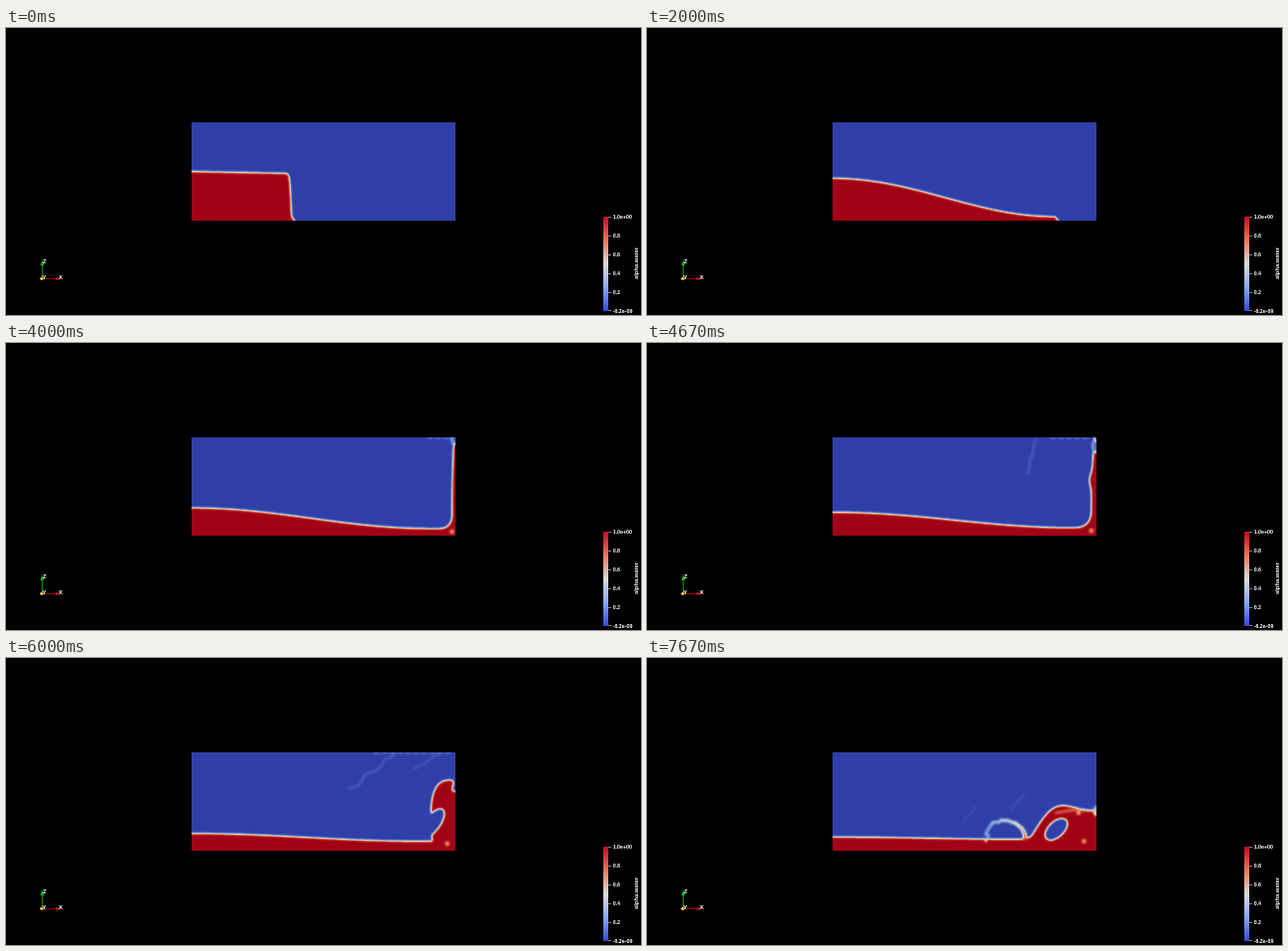
Recreate the animation shown at these times as an HTML page with a canvas. Size 640 by 289 pixels, loop 8 s.

```html
<!DOCTYPE html>
<html lang="en">
<head>
<meta charset="utf-8">
<title>Dam break</title>
<style>
  html, body { margin: 0; width: 100%; height: 100%; overflow: hidden; background: #000; }
  canvas { position: absolute; left: 187px; top: 95px; }
  svg { position: absolute; left: 0; top: 0; }
  text { font: bold 5.3px "Liberation Sans", Arial, sans-serif; fill: #fff; }
  .axes text { font-size: 6px; }
  .scale .title { font-size: 5.8px; }
</style>
</head>
<body>
<canvas id="tank" width="266" height="99"></canvas>
<svg width="640" height="289" viewBox="0 0 640 289">
  <defs>
    <linearGradient id="bar" x1="0" y1="0" x2="0" y2="1">
      <stop offset="0" stop-color="#c00a26"/>
      <stop offset=".25" stop-color="#ea7659"/>
      <stop offset=".5" stop-color="#dcdad8"/>
      <stop offset=".75" stop-color="#86aaf4"/>
      <stop offset="1" stop-color="#3448dc"/>
    </linearGradient>
  </defs>
  <g class="axes">
    <path d="M36.500 252V238" stroke="#0a8c14"/>
    <path d="M34.500 239L36.500 233.500L38.500 239Z" fill="#12b41e"/>
    <path d="M36 252.500H51" stroke="#8c0a0a"/>
    <path d="M50 250.800L55.500 252.500L50 254.200Z" fill="#c01010"/>
    <circle cx="36" cy="252.300" r="1.600" fill="#f0e040"/>
    <text x="37" y="237">Z</text>
    <text x="53" y="253.300">X</text>
    <text x="36.500" y="253">Y</text>
  </g>
  <g class="scale">
    <rect x="602" y="190" width="5" height="95" fill="url(#bar)"/>
    <path d="M607 190.500h3M607 209.500h3M607 228.500h3M607 247.500h3M607 266.500h3M607 284.500h3" stroke="#bbb" stroke-width=".7"/>
    <text x="611.700" y="192">1.0e+00</text>
    <text x="611.700" y="211">0.8</text>
    <text x="611.700" y="230">0.6</text>
    <text x="611.700" y="249">0.4</text>
    <text x="611.700" y="268">0.2</text>
    <text x="611.700" y="287">-6.2e-09</text>
    <text class="title" transform="translate(637 253) rotate(-90)">alpha.water</text>
  </g>
</svg>
<script>
const W = 266, H = 99, PAD = 12, STEPS = 24, LOOP = 8000;
const LEFT = 187, TOP = 95, RIGHT = LEFT + W, DEEP = 215;
const HIT = 8, BREAK = 17, CLOSE = 20; // steps: wall reached, crest breaks, cavity closes
const out = document.getElementById('tank').getContext('2d');

function layer() {
  const c = document.createElement('canvas');
  c.width = W + 2 * PAD;
  c.height = H + 2 * PAD;
  return c.getContext('2d', { willReadFrequently: true });
}
const field = layer(), soft = layer();
field.translate(PAD - LEFT, PAD - TOP);
field.lineCap = field.lineJoin = 'round';
soft.filter = 'blur(0.9px)';

const mix = (a, b, u) => a + (b - a) * u;
const gray = v => { const g = Math.round(v * 255); return `rgb(${g},${g},${g})`; };
const rnd = (seed, i) => {
  const v = Math.sin(seed * 12.9898 + i * 78.233) * 43758.5453;
  return v - Math.floor(v);
};

function line(value, width, ...p) {
  field.strokeStyle = gray(value);
  field.lineWidth = width;
  field.beginPath();
  for (let i = 0; i < p.length; i += 2) field.lineTo(p[i], p[i + 1]);
  field.stroke();
}

function blob(value, x, y, rx, ry = rx, turn = 0) {
  field.fillStyle = gray(value);
  field.beginPath();
  field.ellipse(x, y, rx, ry, turn, 0, 7);
  field.fill();
}

// Cosine slope from the left level down to `low` at x = end; a high power makes it a step.
function slope(k, end, low) {
  const high = 144.5 + 37 * (1 - Math.exp(-Math.pow(k / 12.8, 2.1)));
  const power = 1 + 60 * Math.exp(-1.5 * k);
  field.moveTo(LEFT - 15, DEEP);
  field.lineTo(LEFT - 15, high);
  for (let x = LEFT; x <= end; x += 0.5) {
    const u = (x - LEFT) / (end - LEFT);
    const fall = 0.5 - 0.5 * Math.cos(Math.PI * Math.pow(u, power));
    field.lineTo(x, mix(high, low, fall) + 2 * u * Math.exp(-k) * (1 - fall));
  }
}

function front(k) {
  const x = 288 + 14 * k + 1.1 * k * k;
  slope(k, x, 190);
  field.lineTo(x + 1, 191.5);
  field.lineTo(x + 3, 194);
  field.lineTo(x + 3, DEEP);
}

// Jet climbing the right wall, with a growing bulge.
function jet(k, low) {
  const age = k - HIT, r = 8 + 1.5 * age;
  const face = 451 - 0.09 * age * age;
  const tip = Math.max(84, 192 - 27 * (age + 1));
  const foot = low - r, bulge = 1.2 * Math.max(0, age - 4);
  slope(k, Math.min(400 + 7 * age, face - r), low);
  field.lineTo(face - r, low);
  field.quadraticCurveTo(face, low, face, foot);
  for (let y = foot; y > tip; y--) {
    const u = (foot - y) / (foot - tip), b = (y - 138) / 8;
    field.lineTo(mix(face, 452, u * u) - bulge * Math.exp(-b * b), y);
  }
  field.lineTo(RIGHT + 15, tip);
}

// Breaking crest sliding left and down.
function crest(k, low) {
  const s = (k - CLOSE) / 3;
  const x = 413 - 25 * s, y = low - 4 * Math.max(0, s);
  const px = 436 - 17 * s, py = 133 + 15.5 * s, wall = 141 + 11 * s;
  slope(k, x - 12, low);
  field.quadraticCurveTo(x - 4, low, x, y);
  field.bezierCurveTo(x + 2 + 6 * s, y - 22 + 10 * s, px - 19 + 5 * s, py, px, py);
  field.bezierCurveTo(px + 10, py, 442, wall + 4, RIGHT + 3, wall);
  field.lineTo(RIGHT + 15, wall);
}

function water(k) {
  const low = 188.5 - 0.4 * (k - HIT);
  field.fillStyle = '#fff';
  field.beginPath();
  if (k < HIT) front(k);
  else if (k < BREAK) jet(k, low);
  else crest(k, low);
  field.lineTo(RIGHT + 15, DEEP);
  field.fill();
}

function cavity(k) {
  const s = (k - CLOSE) / 3, open = k < CLOSE ? 8 : 0;
  blob(0, 427.5 - 15 * s - open, 169 + 3.5 * s, 13.7 + open / 2, 7.8, -0.85 + 0.1 * s);
}

// Ragged arch of spray thrown forward by the plunging crest.
function spray(k) {
  const s = (k - CLOSE) / 3, cx = mix(411, 361, s), n = 18;
  let x = cx + 20 * s, y = 182;
  for (let i = 1; i <= n; i++) {
    const u = i / n, a = u * Math.PI, rough = 7 * u * u * s;
    const nx = cx + 20 * s * Math.cos(a) + rough * (rnd(4, i) - 0.5);
    const ny = 181 - 17 * s * Math.sin(a) + rough * (rnd(9, i) - 0.5);
    line(mix(1, 0.33, Math.sqrt(u)), mix(3.4, 2.3, u), x, y, nx, ny);
    x = nx;
    y = ny;
  }
}

function wisp(seed, x, y, n, dx, value) {
  const p = [x, y];
  for (let i = 0; i < n; i++) {
    x -= dx * (0.5 + rnd(seed, i));
    y += 8 * rnd(seed + 1, i);
    p.push(x, y);
  }
  line(value, 1.7, ...p);
}

function mist(k) {
  if (k >= 11 && k < 19) {
    for (let x = 425 - 9 * (k - 12); x < 446; x += 8) line(0.3, 1.2, x, 95.5, x + 5, 95.5);
  }
  if (k >= 14 && k < 23) wisp(3, 392, 97, 10, k - 13, 0.13);
  if (k >= 18 && k < 23) wisp(6, 436, 97, 5, 4, 0.1);
  if (k >= 22) {
    wisp(2, 380, 137, 4, 4, 0.06);
    wisp(5, 331, 150, 3, 4, 0.06);
  }
}

function eddies(k) {
  const u = (k - 12) / 11;
  if (k >= 10) blob(0.62, mix(449.5, 440.5, u), mix(190, 184.5, u), 2.2);
  if (k >= 12 && k < BREAK) {
    const y = 96 + 4 * (k - 12);
    blob(0.45, 452, y, 3.6, 7);
    blob(0.05, 452, y, 1.8, 5);
  }
  if (k >= 19) {
    const s = (k - CLOSE) / 3;
    blob(0.4, RIGHT, 147 + 7 * s, 3.5, 8 - 3 * s);
    line(0.7, 2, 448, 143 + 11 * s, 438 - 9 * s, 141 + 12 * s, 434 - 22 * s, 148 + 8 * s);
    blob(0.55, 438 - 3 * s, 149 + 7 * s, 3 - s);
  }
}

const ramp = [[48, 63, 168], [112, 146, 218], [222, 214, 190], [226, 108, 70], [160, 3, 22]];

function render(k) {
  field.fillStyle = '#000';
  field.fillRect(170, 70, 320, 150);
  mist(k);
  water(k);
  eddies(k);
  if (k > BREAK) cavity(k);
  if (k > CLOSE) spray(k);
  soft.drawImage(field.canvas, 0, 0);
  const img = soft.getImageData(PAD, PAD, W, H), d = img.data;
  for (let i = 0; i < d.length; i += 4) {
    const v = d[i] / 255 * 4, s = Math.min(3, Math.floor(v));
    for (let c = 0; c < 3; c++) d[i + c] = mix(ramp[s][c], ramp[s + 1][c], v - s);
    d[i + 3] = 255;
  }
  out.putImageData(img, 0, 0);
}

let shown = -1;
function tick() {
  const t = performance.now() % LOOP;
  const k = Math.floor((t + 3.4) / LOOP * STEPS) % STEPS;
  if (k !== shown) render(shown = k);
  requestAnimationFrame(tick);
}
tick();
</script>
</body>
</html>
```
